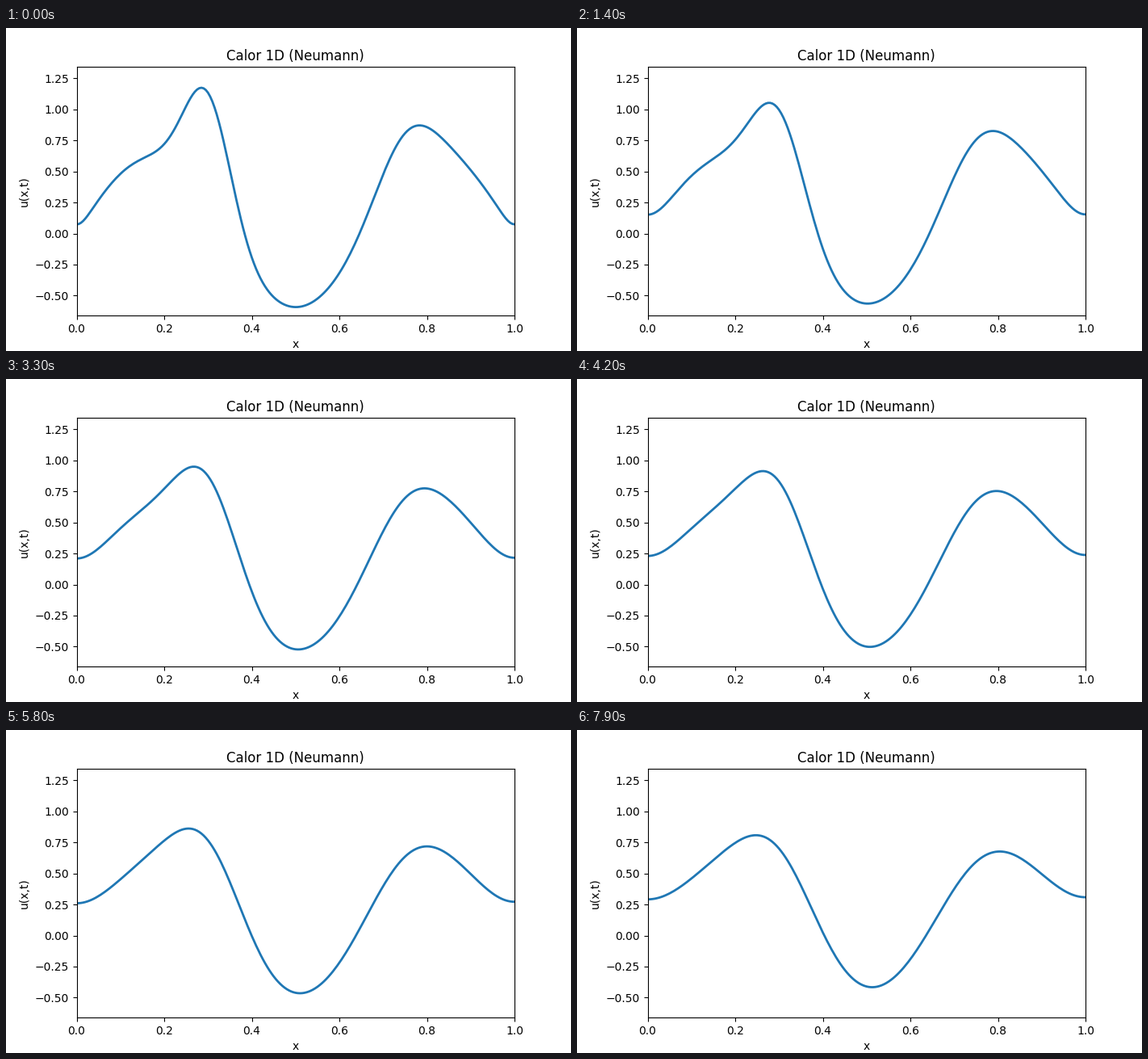
Animation, 700 px wide and 400 px high, one loop 8000 ms. Source, as a matplotlib script:

```python
import numpy as np
import matplotlib.pyplot as plt
from matplotlib.animation import FuncAnimation

FRAMES = 80
INTERVAL = 100       # ms
STEP = 3.375e-5      # diffusivity * time per frame
LEAD = 4             # frames of diffusion before the first one
MODES = 150


def initial(x):
    return (0.6 * np.sin(3 * np.pi * x)
            + np.exp(-200 * (x - 0.3) ** 2)
            + 0.4 * np.exp(-120 * (x - 0.75) ** 2))


x = np.linspace(0, 1, 201)
k = np.arange(MODES)

# Cosine series of the initial profile (zero flux at both ends), midpoint rule
n = 4000
mid = (np.arange(n) + 0.5) / n
coef = 2 * np.cos(np.pi * np.outer(k, mid)) @ initial(mid) / n
coef[0] /= 2
basis = np.cos(np.pi * np.outer(x, k))


def heat(frame):
    tau = STEP * (frame + LEAD)
    return basis @ (coef * np.exp(-(k * np.pi) ** 2 * tau))


u0 = initial(x)
fig, ax = plt.subplots(figsize=(7, 4), dpi=100)
line, = ax.plot(x, heat(0), lw=2)
ax.set_xlim(0, 1)
ax.set_ylim(1.1 * u0.min(), 1.1 * u0.max())
ax.set_xlabel("x")
ax.set_ylabel("u(x,t)")
ax.set_title("Calor 1D (Neumann)")


def update(frame):
    line.set_ydata(heat(frame))
    return line,


anim = FuncAnimation(fig, update, frames=FRAMES, interval=INTERVAL,
                     repeat=True, repeat_delay=0)
plt.show()
```
